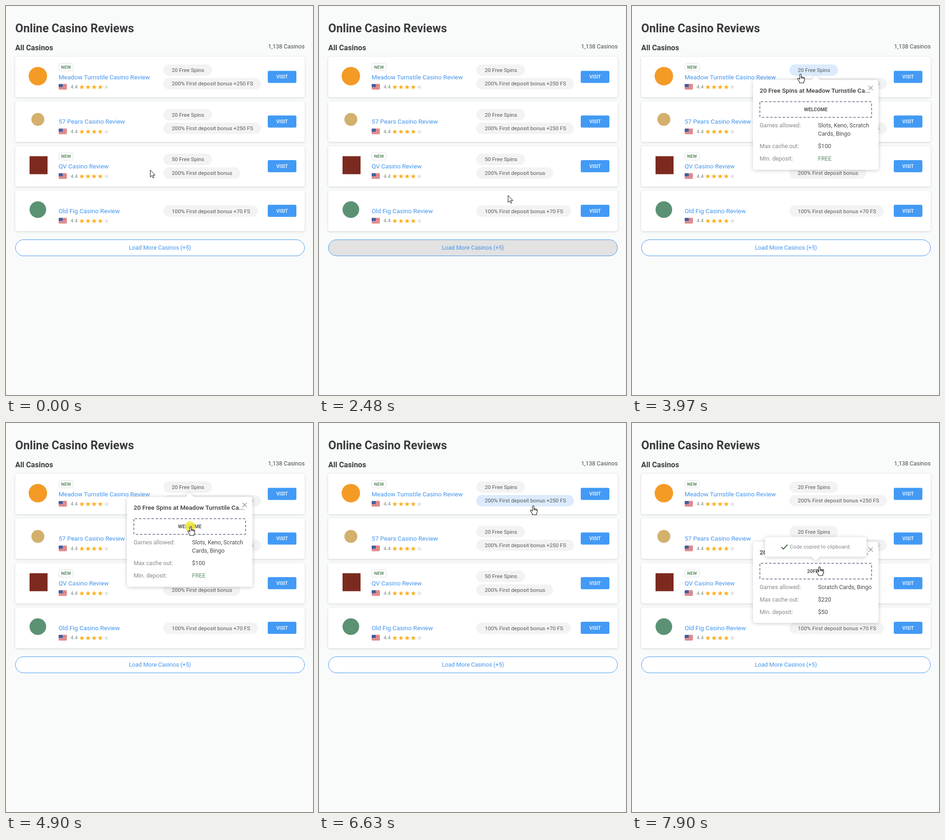
Animation of 665x843 px, one loop 8000 ms. Source, as an HTML page:

```html
<!DOCTYPE html>
<html lang="en">
<head>
<meta charset="utf-8">
<title>Casino reviews</title>
<style>
  html, body { margin: 0; width: 100%; height: 100%; overflow: hidden; background: #f9fbfb; }
  svg { display: block; width: 665px; height: 843px; font-family: Roboto, sans-serif; }
  .card { fill: #fff; filter: drop-shadow(0 1px 2px rgba(0, 0, 0, .17)); }
  .float { fill: #fff; filter: drop-shadow(0 1px 4px rgba(0, 0, 0, .22)); }
</style>
</head>
<body>
<svg id="stage" viewBox="0 0 665 843"></svg>
<script>
const LOOP = 8000, PITCH = 96.75, BLUE = '#429af5', LINK = '#4394ec', GREEN = '#5f9068';
const stage = document.getElementById('stage');
const $ = id => document.getElementById(id);

const text = (x, y, size, fill, str, extra = '') =>
  `<text x="${x}" y="${y}" font-size="${size}" fill="${fill}" ${extra}>${str}</text>`;
const rect = (x, y, w, h, r, extra) =>
  `<rect x="${x}" y="${y}" width="${w}" height="${h}" rx="${r}" ${extra}/>`;
const MID = 'text-anchor="middle"', BOLD = 'font-weight="700"', SEMI = 'font-weight="500"';

const casinos = [
  { name: 'Meadow Turnstile', isNew: true, logo: '<circle cx="69" cy="42" r="20" fill="#f49b26"/>',
    bonuses: [['20 Free Spins', 105.5], ['200% First deposit bonus +250 FS', 211.5]] },
  { name: '57 Pears', logo: '<circle cx="69" cy="39" r="14" fill="#d3b06c"/>',
    bonuses: [['20 Free Spins', 105.5], ['200% First deposit bonus +250 FS', 211.5]] },
  { name: 'QV', isNew: true, logo: rect(51, 22, 39, 39, 0, 'fill="#7c2a20"'),
    bonuses: [['50 Free Spins', 105.5], ['200% First deposit bonus', 166.5]] },
  { name: 'Old Fig', logo: '<circle cx="69" cy="41" r="18" fill="#5b9273"/>',
    bonuses: [['100% First deposit bonus +70 FS', 205]] }
];
const pills = [];

function star(cx, cy, fill) {
  const pts = Array.from({ length: 10 }, (_, i) => {
    const a = i * Math.PI / 5, r = i % 2 ? 2.5 : 5.4;
    return `${(cx + r * Math.sin(a)).toFixed(2)},${(cy - r * Math.cos(a)).toFixed(2)}`;
  });
  return `<polygon points="${pts.join(' ')}" fill="${fill}"/>`;
}

function flag(x, y) {
  let out = rect(x, y, 18, 12.6, 2, 'fill="#f4e6e6"');
  for (let i = 0; i < 7; i++) out += rect(x + (i % 6 ? 0 : .5), y + i * 1.8, i % 6 ? 18 : 17, 1.05, .4, 'fill="#d2484c"');
  return out + rect(x, y, 9, 6.8, 1.5, 'fill="#42609f"');
}

function card(c, i) {
  const top = 110 + i * PITCH;
  let out = rect(20, 0, 627, 87.7, 4, 'class="card"') + c.logo;
  if (c.isNew) {
    out += rect(114.5, 14.5, 31, 16, 3, 'fill="#fff" stroke="#dcdfdd"') +
      text(130, 25.8, 9.9, GREEN, 'NEW', MID + BOLD);
  }
  out += text(114, 48.6, 13.5, LINK, c.name + ' Casino Review') + flag(114, 59) +
    text(140, 69.2, 10.8, '#7c8a7c', '4.4');
  for (let s = 0; s < 5; s++) out += star(164.3 + s * 13.3, 65.8, s < 4 ? '#ffb023' : '#e1e3e7');
  c.bonuses.forEach(([label, w], j) => {
    const y = c.bonuses.length > 1 ? 16.6 + j * 29.5 : 32;
    out += rect(340.7, y, w, 24.6, 12.3, `id="pill${pills.length}"`) +
      text(359, y + 16.3, 11.7, '#58585b', label);
    pills.push({ x: 340.7, y: top + y, w, h: 24.6 });
  });
  out += rect(567, 30.5, 62, 26.2, 3, `fill="${BLUE}"`) +
    text(598, 47.4, 10.35, '#fff', 'VISIT', MID + SEMI);
  return `<g transform="translate(0 ${top})">${out}</g>`;
}

// Rows hold a label, its value lines and an optional colour.
function popup(id, top, height, title, code, rows) {
  let y = 103, out = `<path class="float" d="M267 0H388.500L398 -9L407.500 0H529a5 5 0 0 1 5 5V${height - 5}a5 5 0 0 1-5 5H267a5 5 0 0 1-5-5V5a5 5 0 0 1 5-5Z"/>` +
    text(276.5, 28, 13.5, '#3a3a3f', title, SEMI) +
    '<path d="M512.300 12.500l9.400 9.400m0-9.400l-9.400 9.400" stroke="#85858a" stroke-width="1.200"/>' +
    rect(277, 47, 242, 34, 2, 'fill="none" stroke="#807c9a" stroke-width="1.800" stroke-dasharray="5.400 3.600"') +
    text(398, 67.6, 10.8, '#555558', code, MID + BOLD);
  for (const [label, lines, fill = '#4a4a4d'] of rows) {
    out += text(276.5, y, 12.6, '#87898a', label);
    lines.forEach((line, i) => { out += text(403, y + i * 18, 12.6, fill, line); });
    y += 27 + (lines.length - 1) * 18;
  }
  return `<g id="${id}" transform="translate(0 ${top})">${out}</g>`;
}

const toast = '<g id="toast"><path class="float" d="M293 0H503a5 5 0 0 1 5 5V37.500a5 5 0 0 1-5 5H407L398 51L389 42.500H293a5 5 0 0 1-5-5V5a5 5 0 0 1 5-5Z"/>' +
  '<path d="M323.500 21.500l4.300 4.300l9-9.500" fill="none" stroke="#2f5c33" stroke-width="1.900"/>' +
  text(341.5, 25, 11.7, '#88898b', 'Code copied to clipboard.') + '</g>';

const cursor = '<circle id="click" r="11" fill="#f2e626" opacity=".8"/><g id="cursor" fill="#fff" stroke="#111" stroke-linejoin="round">' +
  '<path id="arrow" d="M.5 .5V15.500L4 12.300L6.300 17.700L8.700 16.700L6.400 11.500H11Z"/>' +
  '<path id="hand" stroke-width="1.100" d="M-1.600 1.500Q0-1 1.600 1.500V7q1.500-1 2.400.6q1.600-.9 2.500.7q2-.6 2.200 1.300V13q0 2.500-1.500 4V19.700H-2V17.800L-6 11.500q-.8-2 1-2q1.200 0 3.400 2.300ZM1.600 7V10M4 7.600V10.500M6.500 8.300V11"/></g>';

stage.innerHTML = text(20, 56.6, 25.2, '#3b3b3e', 'Online Casino Reviews', BOLD) +
  text(20, 96, 16.2, '#3b3b3e', 'All Casinos', BOLD) +
  text(647, 92.3, 12.6, '#47484b', '1,138 Casinos', 'text-anchor="end"') +
  `<g id="list">${casinos.map(card).join('')}</g>` +
  rect(20, 119, 627, 76, 3, 'id="loader" fill="#e7f1fb"') +
  `<g id="more">${rect(20.5, 506.5, 626, 35, 17.5, 'id="moreBox"')}${text(333.5, 527.8, 12.6, LINK, 'Load More Casinos (+5)', MID + 'id="moreText"')}</g>` +
  popup('pop0', 160.3, 194.7, '20 Free Spins at Meadow Turnstile Ca...', 'WELCOME', [
    ['Games allowed:', ['Slots, Keno, Scratch', 'Cards, Bingo']],
    ['Max cache out:', ['$100']], ['Min. deposit:', ['FREE'], GREEN]]) +
  popup('pop1', 160.3 + PITCH, 176.3, '20 Free Spins at 57 Pears Casino Rev...', '20FREE', [
    ['Games allowed:', ['Scratch Cards, Bingo']],
    ['Max cache out:', ['$220']], ['Min. deposit:', ['$50']]]) +
  toast + cursor;

// start, end, steps, from x y, bend x y, to x y
const moves = [
  [180, 250, 2, 312, 355, 312, 354, 312, 353.5],
  [510, 580, 2, 312, 353.5, 400, 385, 585, 405],
  [1990, 2270, 5, 660, 412, 530, 412, 409, 410],
  [3020, 3770, 11, 409, 410, 362, 360, 365, 147],
  [4300, 4700, 6, 365, 147, 374, 195, 400, 224],
  [5760, 6040, 5, 400, 224, 430, 170, 463, 132],
  [6500, 6630, 3, 463, 132, 466, 155, 464, 179],
  [6700, 7040, 6, 464, 179, 450, 225, 402, 238],
  [7430, 7760, 5, 402, 238, 402, 285, 406, 311]
];
const clicks = [[3900, 3970], [4900, 5030], [5500, 5560], [6100, 6230], [7100, 7170], [7830, 7900]];

const within = (t, a, b) => t >= a && t < b;
const inside = (p, x, y, w, h) => p.x >= x && p.x <= x + w && p.y >= y && p.y <= y + h;
const show = (id, on) => { $(id).style.display = on ? '' : 'none'; };

function pointer(t) {
  const m = moves.filter(v => v[0] <= t).pop();
  if (!m) return { x: 312, y: 355 };
  const [a, b, n, x0, y0, cx, cy, x1, y1] = m;
  const k = Math.min(n, Math.floor((t - a) / (b - a) * (n - 1) + 1e-6) + 1) / n;
  const p = k * k * (3 - 2 * k), q = 1 - p;
  const bend = (u, v, w) => q * q * u + 2 * q * p * v + p * p * w;
  return { x: bend(x0, cx, x1), y: bend(y0, cy, y1) };
}

function render(t) {
  const loading = within(t, 1450, 2480);
  const open = within(t, 3970, 6170) ? 0 : t >= 7170 ? 1 : -1;
  const pos = pointer(t);

  show('list', !loading);
  show('loader', loading);
  show('pop0', open === 0);
  show('pop1', open === 1);
  show('toast', within(t, 5030, 6170) || t >= 7900);
  $('toast').setAttribute('transform', `translate(0 ${247.3 - (open === 0 ? PITCH : 0)})`);

  const fade = within(t, 2480, 2760) ? 1 - Math.floor((t - 2480) / 70) / 4 : 0;
  const shade = Math.round(255 - 29 * fade);
  $('more').setAttribute('transform', `translate(0 ${loading ? -293 : 0})`);
  $('moreBox').setAttribute('fill', loading ? '#e2e2e2' : `rgb(${shade},${shade},${shade})`);
  $('moreBox').setAttribute('stroke', loading ? '#e2e2e2' : LINK);
  $('moreText').setAttribute('fill', loading ? '#fff' : LINK);

  const top = 160.3 + open * PITCH;
  const covered = open >= 0 && inside(pos, 262, top, 272, open ? 176 : 195);
  let hand = covered && inside(pos, 276, top + 46, 244, 36);
  pills.forEach((b, i) => {
    const over = !loading && !covered && inside(pos, b.x, b.y, b.w, b.h);
    hand = hand || over;
    $('pill' + i).setAttribute('fill', over ? '#dbebfd' : '#f3f3f3');
  });

  show('cursor', !within(t, 650, 1990));
  show('arrow', !hand);
  show('hand', hand);
  show('click', clicks.some(([a, b]) => within(t, a, b)));
  $('cursor').setAttribute('transform', `translate(${pos.x.toFixed(1)} ${pos.y.toFixed(1)})`);
  $('click').setAttribute('transform', `translate(${pos.x - 1} ${pos.y})`);
}

const begin = performance.now();
function tick(now) {
  render(Math.max(0, now - begin) % LOOP);
  requestAnimationFrame(tick);
}
render(0);
requestAnimationFrame(tick);
</script>
</body>
</html>
```
